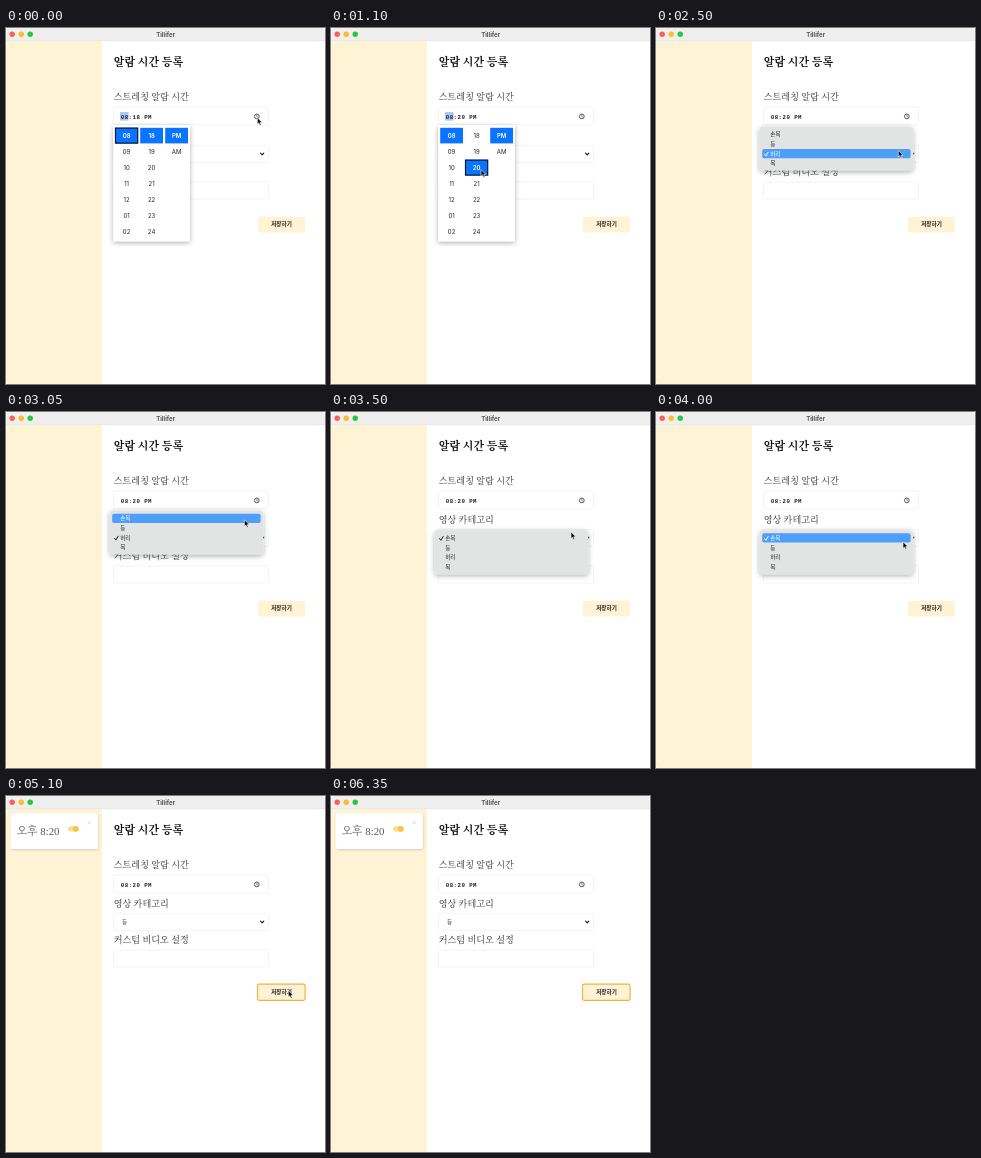
An HTML page that plays this animation: 319 px wide and 356 px high, repeating every 6.95 s.

```html
<!DOCTYPE html>
<html lang="ko">
<head>
<meta charset="utf-8">
<title>Tillifer</title>
<style>
  html, body { margin: 0; width: 100%; height: 100%; overflow: hidden; background: #fff; }
  svg { display: block; width: 100%; height: 100%; }
  .ui { font-family: Inter, "Noto Sans CJK KR", "Noto Sans CJK", sans-serif; }
  .serif { font-family: "Liberation Serif", "Noto Serif CJK KR", "Noto Sans CJK KR", "Noto Sans CJK", serif; }
  .mono { font-family: "Liberation Mono", monospace; font-weight: 700; letter-spacing: .45px; }
  text { white-space: pre; }
</style>
</head>
<body>
<svg id="stage" viewBox="0 0 319 356">
  <defs>
    <filter id="soft" x="-20%" y="-20%" width="140%" height="150%">
      <feDropShadow dx="0" dy="1.5" stdDeviation="2.4" flood-color="#000" flood-opacity=".33"/>
    </filter>
    <filter id="faint" x="-20%" y="-20%" width="140%" height="150%">
      <feDropShadow dx="0.6" dy="0.9" stdDeviation="1" flood-color="#000" flood-opacity=".16"/>
    </filter>
    <clipPath id="frame"><rect width="319" height="356" rx="4"/></clipPath>
  </defs>
</svg>
<script>
const LOOP = 6950;
const CREAM = '#fff3d6', BLUE = '#0a74ff';
const stage = document.getElementById('stage');

function add(parent, tag, attrs) {
  const el = document.createElementNS('http://www.w3.org/2000/svg', tag);
  for (const k in attrs) el.setAttribute(k, attrs[k]);
  parent.appendChild(el);
  return el;
}
const group = (parent, attrs = {}) => add(parent, 'g', attrs);
const box = (parent, x, y, width, height, fill, more = {}) =>
  add(parent, 'rect', { x, y, width, height, fill, ...more });
const line = (parent, d, stroke, width) =>
  add(parent, 'path', { d, fill: 'none', stroke, 'stroke-width': width, 'stroke-linecap': 'round', 'stroke-linejoin': 'round' });
// cy is the optical middle of the line of text
function label(parent, str, x, cy, size, fill, cls = 'ui', more = {}) {
  const el = add(parent, 'text', { x, y: cy + size * 0.365, 'font-size': size, fill, class: cls, ...more });
  el.textContent = str;
  return el;
}
const show = (el, on) => el.setAttribute('visibility', on ? 'visible' : 'hidden');
const MID = { 'text-anchor': 'middle' };
const MEDIUM = { 'font-weight': 500 };

// Window
const win = group(stage, { 'clip-path': 'url(#frame)' });
box(win, 0, 13, 96, 343, CREAM);
box(win, 0, 0, 319, 13, '#eeefee');
box(win, 0, 12.6, 319, 0.5, '#e0e0df');
['#fe5f57', '#febc2e', '#28c840'].forEach((fill, i) =>
  add(win, 'circle', { cx: 6.2 + i * 9, cy: 6.3, r: 2.7, fill }));
label(win, 'Tillifer', 159.7, 6.4, 6.1, '#555', 'ui', { ...MID, 'font-weight': 700 });

// Saved alarm
const card = group(stage);
box(card, 4.8, 17, 87, 36, '#fff', { rx: 2, filter: 'url(#faint)' });
label(card, '오후 8:20', 10.7, 34.6, 10.8, '#555', 'serif', MEDIUM);
box(card, 62, 30.2, 10.6, 5.4, '#ffdc8c', { rx: 2.7 });
add(card, 'circle', { cx: 69.8, cy: 32.9, r: 2.8, fill: '#fcc24c' });
line(card, 'M82.2 25.6l2 2m0-2l-2 2', '#c8c8c8', 0.6);

// Form
label(stage, '알람 시간 등록', 107.8, 34.3, 11, '#111', 'serif', { 'font-weight': 700 });
[['스트레칭 알람 시간', 69], ['영상 카테고리', 107.2], ['커스텀 비디오 설정', 144]].forEach(([s, y]) =>
  label(stage, s, 107.7, y, 9.15, '#303030', 'serif', MEDIUM));
[79.3, 117.3, 153.8].forEach(y =>
  box(stage, 107.5, y, 155, 17.2, '#fff', { stroke: '#f2f2f2', 'stroke-width': 0.8, rx: 1 }));

const hourMark = box(stage, 114, 84, 8.6, 8.6, '#a9cbf5');
const clockText = label(stage, '', 114.8, 88.5, 5.75, '#222', 'mono');
add(stage, 'circle', { cx: 250.8, cy: 88.4, r: 2.4, fill: 'none', stroke: '#333', 'stroke-width': 0.8 });
line(stage, 'M250.8 87v1.5l1.1 .7', '#333', 0.6);

const choice = label(stage, '', 116, 126, 5.6, '#333', 'ui', MEDIUM);
line(stage, 'M254.6 125.2l1.6 1.6l1.6-1.6', '#111', 1.1);

box(stage, 252, 188.8, 47, 15.6, CREAM, { rx: 2 });
const ring = box(stage, 251.5, 188.2, 47.6, 16.2, 'none', { rx: 1.8, stroke: '#f3b140', 'stroke-width': 1.2 });
label(stage, '저장하기', 275.5, 196.4, 5.6, '#222', 'ui', { ...MID, 'font-weight': 600 });

// Time picker
const picker = group(stage);
box(picker, 107.3, 97.3, 76.5, 116, '#fff', { filter: 'url(#soft)' });
const COLS = [109.2, 134.2, 159.2];
const rowY = r => 99.8 + r * 16;
const chips = COLS.map(x => box(picker, x, rowY(0), 22.8, 15.6, BLUE));
const focus = box(picker, 0, 0, 22.2, 15, 'none', { stroke: '#061a3c', 'stroke-width': 1.2 });
const cells = [
  ['08', '09', '10', '11', '12', '01', '02'],
  ['18', '19', '20', '21', '22', '23', '24'],
  ['PM', 'AM']
].map((col, c) => col.map((s, r) => label(picker, s, COLS[c] + 11.4, rowY(r) + 7.8, 6, '#222', 'ui', MID)));

function setPicker(minuteRow) {
  const picked = [0, minuteRow, 0];
  chips.forEach((chip, c) => chip.setAttribute('y', rowY(picked[c])));
  cells.forEach((col, c) => col.forEach((el, r) => {
    const on = r === picked[c];
    el.setAttribute('fill', on ? '#fff' : '#222');
    el.setAttribute('font-weight', on ? 600 : 400);
  }));
  focus.setAttribute('x', (minuteRow ? COLS[1] : COLS[0]) + 0.3);
  focus.setAttribute('y', rowY(minuteRow) + 0.3);
}

// Category menu
const PARTS = ['손목', '등', '허리', '목'];
const PITCH = 9.65;
const menu = group(stage);
box(menu, 103.6, 0, 153.6, 44, '#e1e4e3', { rx: 4, filter: 'url(#soft)' });
const bar = box(menu, 106.2, 0, 148.4, 9.3, '#4e9ffa', { rx: 1.8 });
const items = PARTS.map((s, i) => label(menu, s, 114.2, 7.8 + i * PITCH, 5.6, '#222', 'ui', MEDIUM));
const tick = line(menu, 'M108.6 0l1.3 1.7l2.3-3.8', '#111', 0.95);

function setMenu(top, checked, hot, alpha) {
  menu.setAttribute('transform', `translate(0 ${top})`);
  menu.setAttribute('opacity', alpha);
  bar.setAttribute('opacity', hot >= 0 ? 1 : 0);
  bar.setAttribute('y', 3.1 + hot * PITCH);
  items.forEach((el, i) => el.setAttribute('fill', i === hot ? '#fff' : '#222'));
  tick.setAttribute('transform', `translate(0 ${8.4 + checked * PITCH})`);
  tick.setAttribute('stroke', checked === hot ? '#fff' : '#111');
}

// Pointer
const pointer = add(stage, 'path', {
  d: 'M0 0V6.6L1.5 5.3L2.6 7.8L3.8 7.3L2.7 4.9L4.8 4.8Z',
  fill: '#050505', stroke: '#fff', 'stroke-width': 0.6, 'stroke-linejoin': 'round'
});
const PATH = [
  [0, 251.3, 89.6], [50, 251.3, 89.6], [700, 150, 141.6], [1350, 150, 141.6],
  [1680, 243.5, 124], [1850, 244.5, 131.2], [2000, 244.5, 131.2], [2250, 243, 125],
  [2400, 243, 125], [2800, 238.4, 107.8], [3100, 238.4, 107.8], [3330, 240, 119.9],
  [3650, 240, 119.9], [4200, 250, 134], [4330, 250, 134], [4450, 264.5, 162.4], [4800, 282.3, 194.5]
];
function pointerAt(t) {
  const i = PATH.findIndex(p => p[0] > t);
  if (i < 0) return PATH[PATH.length - 1].slice(1);
  const [t0, x0, y0] = PATH[i - 1], [t1, x1, y1] = PATH[i];
  const u = (t - t0) / (t1 - t0), e = u * u * (3 - 2 * u);
  return [x0 + (x1 - x0) * e, y0 + (y1 - y0) * e];
}

const fade = (t, start, end) => Math.max(0, Math.min(1, (end - t) / (end - start)));

function draw(t) {
  const [x, y] = pointerAt(t);
  pointer.setAttribute('transform', `translate(${x} ${y})`);
  show(pointer, t < 6050);

  const picking = t < 1650;
  show(picker, picking);
  show(hourMark, picking);
  setPicker(t < 750 ? 0 : 2);
  clockText.textContent = t < 980 ? '08:18 PM' : '08:20 PM';

  // The menu opens twice, each time lined up with its checked item
  const second = t >= 3350;
  const top = second ? 118.2 : 98.6;
  let hot = Math.floor((y - top - 3) / PITCH);
  if (t >= 2980 && t < 3030) hot = -1;
  if (t >= 4330) hot = 1;
  let alpha = 0;
  if (second) alpha = fade(t, 4400, 4650);
  else if (t >= 1700) alpha = fade(t, 3060, 3220);
  setMenu(top, second ? 0 : 2, hot, alpha);
  show(menu, alpha > 0);
  choice.textContent = PARTS[t < 3060 ? 2 : t < 4500 ? 0 : 1];

  show(ring, t >= 4980);
  show(card, t >= 5050);
}

const start = performance.now();
function loop(now) {
  draw(Math.max(0, now - start) % LOOP);
  requestAnimationFrame(loop);
}
draw(0);
requestAnimationFrame(loop);
</script>
</body>
</html>
```
